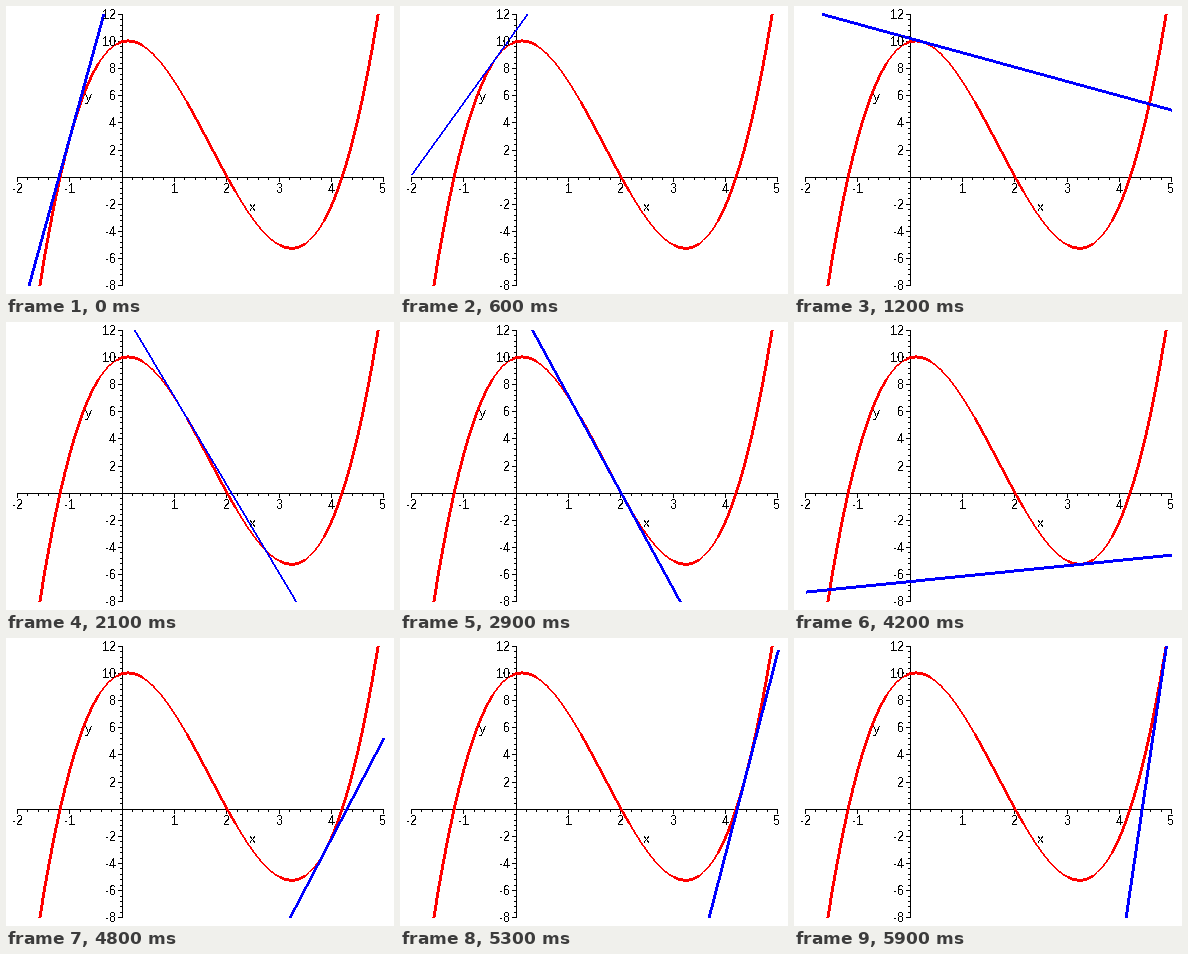
These frames come from a looping animation (388 by 288 pixels, 6 s). A matplotlib script:

```python
import math

import matplotlib.pyplot as plt
import numpy as np
from matplotlib.animation import FuncAnimation
from matplotlib.collections import PolyCollection

plt.rcParams.update({
    "font.family": "Liberation Sans",
    "font.size": 14.625,  # 13 px at 64 dpi
    "text.antialiased": False,
    "text.hinting": "native",
    "text.hinting_factor": 1,
    "axes.unicode_minus": False,
})

W, H, DPI = 388, 288, 64
FRAMES, INTERVAL = 60, 100
X_MIN, X_MAX, Y_MIN, Y_MAX = -2, 5, -8, 12
LEFT, RIGHT, TOP, BOTTOM = 11.3, 377.9, 7.9, 279.3
CUBIC = np.poly1d([1, -5, 1, 10])
SLOPE = CUBIC.deriv()


def px(x):
    return LEFT + (x - X_MIN) * (RIGHT - LEFT) / (X_MAX - X_MIN)


def py(y):
    return TOP + (Y_MAX - y) * (BOTTOM - TOP) / (Y_MAX - Y_MIN)


def real_root(poly):
    roots = poly.roots
    return roots[np.argmin(abs(roots.imag))].real


def box(x, y, w, h):
    return [(x, y), (x + w, y), (x + w, y + h), (x, y + h)]


def stroke(p, q):
    """Pixel runs of a line: across for steep ones, down for shallow ones."""
    dx, dy = abs(q[0] - p[0]), abs(q[1] - p[1])
    steep = dy > dx
    if steep:
        p, q = p[::-1], q[::-1]
    (a, u), (b, v) = sorted([tuple(p), tuple(q)])
    # The pen is thinner more than 30 degrees away from either axis.
    size = 3 if min(dx, dy) < math.tan(math.pi / 6) * max(dx, dy) else 2
    runs = []
    for s in range(math.ceil(a), math.floor(b) + 1):
        mid = u + (v - u) * (s - a) / (b - a)
        t = math.floor(mid - size / 2 + 1)
        runs.append(box(t, s, size, 1) if steep else box(s, t, 1, size))
    return runs


def add_shapes(polys, color, z):
    shapes = PolyCollection(polys, facecolors=color, edgecolors="none",
                            linewidths=0, antialiaseds=False, zorder=z)
    ax.add_collection(shapes, autolim=False)
    return shapes


def label(x, y, text, ha):
    ax.text(x, y, text, ha=ha, va="baseline", color="black", zorder=4)


def draw_axes():
    x0, y0 = math.floor(px(0)), round(py(0))
    bars = [box(11, y0, 367, 1), box(x0, 8, 1, 272)]
    for k in range(5 * (X_MAX - X_MIN) + 1):
        size = 2 if k % 5 else 4
        bars.append(box(math.floor(px(X_MIN + k / 5)), y0 + 1, 1, size))
    for k in range(5 * (Y_MAX - Y_MIN) // 2 + 1):
        size = 2 if k % 5 else 4
        bars.append(box(x0 - size, round(py(Y_MIN + 2 * k / 5)), size, 1))
    add_shapes(bars, "black", 1)

    for x in range(X_MIN, X_MAX + 1):
        if x:
            label(math.floor(px(x)) + 0.5, 187, str(x), "center")
    for y in range(Y_MIN, Y_MAX + 1, 2):
        if y:
            label(110, round(py(y)) + 5, str(y), "right")
    label(79, 95, "y", "left")
    label(243, 205, "x", "left")


def draw_curve():
    xs = np.linspace(real_root(CUBIC - Y_MIN), real_root(CUBIC - Y_MAX), 70)
    pts = list(zip(px(xs), py(CUBIC(xs))))
    runs = [run for p, q in zip(pts, pts[1:]) for run in stroke(p, q)]
    add_shapes(runs, "#ff0000", 2)


def update(i):
    a = -1 + 6 * i / (FRAMES - 1)
    m, b = SLOPE(a), CUBIC(a)
    ends = np.array([a + (y - b) / m for y in (Y_MIN, Y_MAX)])
    xs = np.clip(np.sort(ends), X_MIN, X_MAX)
    p, q = zip(px(xs), py(b + m * (xs - a)))
    tangent.set_verts(stroke(p, q))
    return [tangent]


fig = plt.figure(figsize=(W / DPI, H / DPI), dpi=DPI, facecolor="white")
ax = fig.add_axes([0, 0, 1, 1])
ax.set_xlim(0, W)
ax.set_ylim(H, 0)
ax.axis("off")

draw_axes()
draw_curve()
tangent = add_shapes([], "#0000ff", 3)

anim = FuncAnimation(fig, update, frames=FRAMES, interval=INTERVAL,
                     init_func=lambda: update(0), repeat=True, repeat_delay=0)
plt.show()
```
